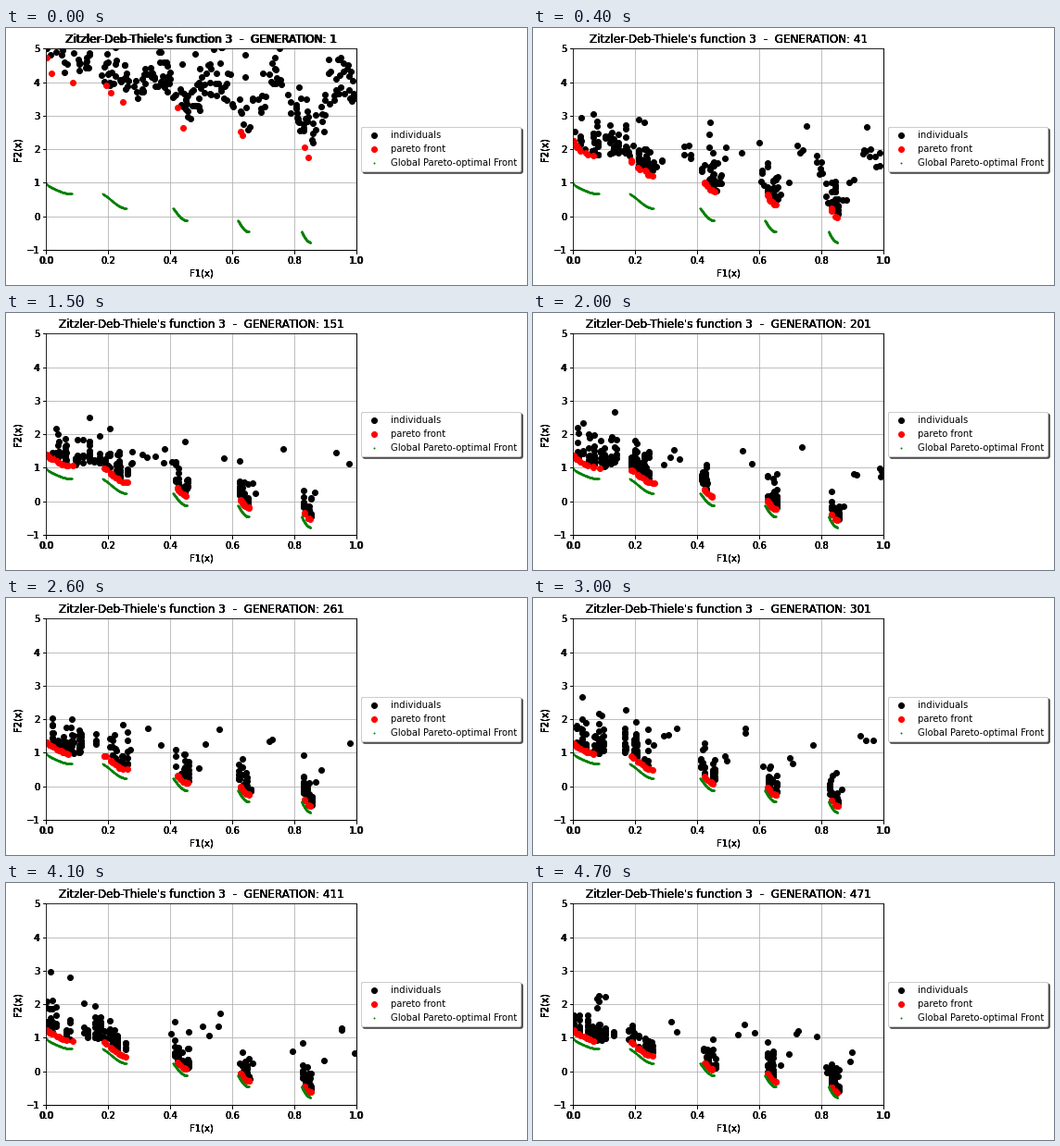
A matplotlib script that plays this animation: 562 px wide and 278 px high, repeating every 4800 ms.

```python
import numpy as np
import matplotlib.pyplot as plt
from matplotlib.animation import FuncAnimation
from matplotlib.lines import Line2D

W, H, DPI = 562, 278, 72
FRAMES, STEP = 48, 10
LAYERS = 4  # stacked axes give the heavy text and the dark legend shadow

plt.rcParams.update({"font.family": "DejaVu Sans", "font.size": 10})

# Disconnected parts of the optimal front
PARTS = [(0, .083), (.183, .2578), (.4094, .4539), (.6184, .6525), (.8233, .8518)]


def f2(x, g):
    return g - np.sqrt(x * g) - x * np.sin(10 * np.pi * x)


def youth(gen):
    return np.exp(-(gen - 1) / 27)


def level(gen):
    """Best g(x) so far: a quick drop, then slow convergence."""
    return 1.18 + .4 * np.exp(-(gen - 1) / 250) + 2.87 * youth(gen)


def pick(rng, n):
    """Random x in every part; the left parts hold more."""
    return np.concatenate([rng.uniform(a + .003, b + .006, int(n * (1 + 5 * (b - a))))
                           for a, b in PARTS])


def pareto(x, y):
    order = np.argsort(x)
    x, y = x[order], y[order]
    best = np.minimum.accumulate(np.r_[np.inf, y[:-1]])
    return x[y < best], y[y < best]


def front(gen):
    young = youth(gen)
    x = np.r_[.001, pick(np.random.default_rng(3), 12)]
    x = x[::int(1 + 3 * young)]
    slack = np.random.default_rng(gen).uniform(0, .035 + .12 * young, x.size)
    return pareto(x, f2(x, level(gen) * (1 + slack)))


def crowd(gen, fx, fy):
    rng = np.random.default_rng(1000 + gen)
    young, n = youth(gen), 260
    columns = np.r_[np.zeros(5), rng.uniform(.08, .18, 6), pick(rng, 6)]
    x = np.where(rng.random(n) < young, rng.random(n), rng.choice(columns, n))
    excess = rng.gamma(1.3 + 1.7 * young, .27 + .08 * young, n) * np.where(x == 0, 1.4, 1)
    stray = rng.uniform(.25, 1, 18)
    x = np.r_[x, stray]
    y = f2(x, level(gen) + np.r_[.04 + excess, rng.uniform(.2, 1.1, stray.size)])
    dominated = ((fx <= x[:, None]) & (fy <= y[:, None])).any(axis=1)
    return x[dominated], y[dominated]


def dots(color, size, marker, label):
    return Line2D([], [], color=color, marker=marker, ms=size, ls="none", label=label)


def make_axes(fig, shift=0):
    ax = fig.add_axes([(43.2 + shift) / W, 38.16 / H, 334.8 / W, 217.44 / H])
    ax.set(xlim=(0, 1), ylim=(-1, 5), xlabel="F1(x)", ylabel="F2(x)")
    return ax


def add_content(ax):
    ax.grid(True)
    lines = [dots("black", 6, "o", "individuals"),
             dots("red", 6, "o", "pareto front"),
             dots("green", 2, ".", "Global Pareto-optimal Front")]
    for line in lines:
        ax.add_line(line)
    ax.legend(handles=lines, loc="center left", bbox_to_anchor=(1, .5),
              shadow=True, fancybox=True)
    return lines


fig = plt.figure(figsize=(W / DPI, H / DPI), dpi=DPI, facecolor="white")

# Text-only layer, slightly offset, smears the labels
smear = make_axes(fig, .6)
smear.tick_params(color="none")
smear.spines[:].set_visible(False)

layers = [make_axes(fig) for _ in range(LAYERS)]
people, best, optimum = [add_content(ax) for ax in layers][-1]
curve = np.concatenate([np.linspace(a, b, 100) for a, b in PARTS])
optimum.set_data(curve, f2(curve, 1))


def update(i):
    gen = 1 + STEP * i
    fx, fy = front(gen)
    best.set_data(fx, fy)
    people.set_data(*crowd(gen, fx, fy))
    for ax in [smear, *layers]:
        ax.set_title(f"Zitzler-Deb-Thiele's function 3  -  GENERATION: {gen}")
    return people, best


anim = FuncAnimation(fig, update, frames=FRAMES, interval=100, repeat=True, repeat_delay=0)
plt.show()
```
